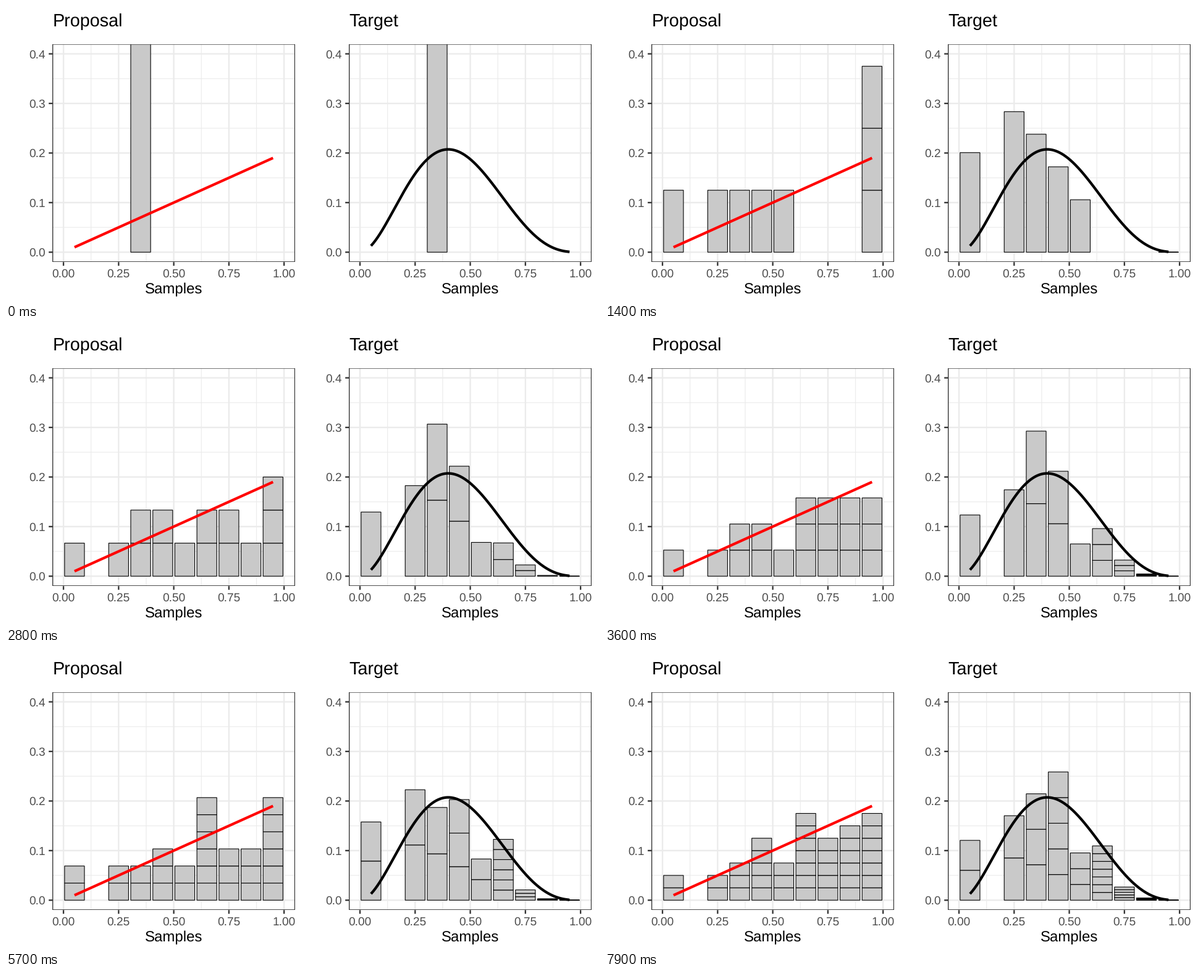
Recreate the animation shown at these times as a matplotlib script. Size 960 px wide and 480 px high, loop 8000 ms.

```python
import numpy as np
import matplotlib.pyplot as plt
from matplotlib.animation import FuncAnimation
from matplotlib.collections import PolyCollection
from matplotlib.patches import Rectangle

W, H, DPI = 960, 480, 100
PX = 72 / DPI                        # points per pixel
LEFT, RIGHT, TOP, BOTTOM = 75.2, 468, 61.5, 415.3
THICK = 2.33
STEP_MS = 200

# bin of every draw, in order (bin k covers (k-1)/10 to k/10)
DRAWS = [4, 1, 10, 10, 5, 3, 6, 10, 7, 8,
         4, 9, 7, 8, 5, 9, 7, 9, 8, 7,
         6, 10, 1, 10, 5, 7, 10, 3, 7, 10,
         9, 4, 5, 6, 7, 9, 8, 5, 9, 8]

plt.rcParams["font.family"] = "Liberation Sans"
plt.rcParams["text.hinting"] = "none"

fig = plt.figure(figsize=(W / DPI, H / DPI), dpi=DPI, facecolor="white")
page = fig.add_axes([0, 0, 1, 1])
page.set_xlim(0, W)
page.set_ylim(H, 0)
page.axis("off")


def label(x, y, text, size, color="black", ha="center"):
    page.text(x, y, text, fontsize=size * PX, color=color, ha=ha, va="baseline")


def tick(xs, ys):
    page.plot(xs, ys, color="#333333", lw=THICK * PX,
              solid_capstyle="butt", snap=False)


def to_x(v):
    return LEFT + (v + 0.05) / 1.1 * (RIGHT - LEFT)


def to_y(v):
    return BOTTOM - (v + 0.02) / 0.44 * (BOTTOM - TOP)


def make_panel(dx, title, curve, color):
    """Draw one framed plot and return its collection of bars."""
    ax = fig.add_axes([(LEFT + dx) / W, 1 - BOTTOM / H,
                       (RIGHT - LEFT) / W, (BOTTOM - TOP) / H])
    ax.set_xlim(-0.05, 1.05)
    ax.set_ylim(-0.02, 0.42)
    ax.axis("off")

    grid = dict(color="#EBEBEB", zorder=0, snap=False)
    for i in range(4):
        ax.axvline(0.125 + i / 4, lw=THICK / 2 * PX, **grid)
        ax.axhline(0.05 + i / 10, lw=THICK / 2 * PX, **grid)
    for i in range(5):
        ax.axvline(i / 4, lw=THICK * PX, **grid)
        ax.axhline(i / 10, lw=THICK * PX, **grid)

        x, y = to_x(i / 4) + dx, to_y(i / 10)
        tick([x, x], [BOTTOM, BOTTOM + 6])
        tick([LEFT + dx - 6, LEFT + dx], [y, y])
        label(x, 440, f"{i / 4:.2f}", 19.2, "#4D4D4D")
        label(LEFT + dx - 11, y + 6.9, f"{i / 10:.1f}", 19.2, "#4D4D4D", "right")

    bars = PolyCollection([], facecolors="#C9C9C9", edgecolors="black",
                          linewidths=1.1 * PX, zorder=2, snap=False,
                          joinstyle="miter")
    ax.add_collection(bars, autolim=False)

    xs = np.linspace(0.05, 0.95, 181)
    ax.plot(xs, curve(xs), color=color, lw=4.27 * PX, zorder=3,
            solid_capstyle="butt")
    ax.add_patch(Rectangle((0, 0), 1, 1, transform=ax.transAxes, fill=False,
                           ec="#333333", lw=THICK * PX, zorder=4, snap=False))

    label(LEFT + dx, 33, title, 28.8, ha="left")
    label((LEFT + RIGHT) / 2 + dx, 466, "Samples", 24)
    return bars


def stack(bins, weight):
    """Boxes of normalised weight, piled up bin by bin."""
    total = sum(weight(b / 10) for b in bins)
    tops = [0.0] * 11
    boxes = []
    for b in bins:
        lo = tops[b]
        hi = tops[b] = lo + weight(b / 10) / total
        x0, x1 = b / 10 - 0.095, b / 10 - 0.005
        boxes.append([(x0, lo), (x1, lo), (x1, hi), (x0, hi)])
    return boxes


proposal = make_panel(0, "Proposal", lambda x: 0.2 * x, "#FF0000")
target = make_panel(480, "Target", lambda x: 6 * x**2 * (1 - x)**3, "black")


def update(i):
    bins = DRAWS[:i + 1]
    proposal.set_verts(stack(bins, lambda x: 1))
    target.set_verts(stack(bins, lambda x: x * (1 - x)**3))
    return proposal, target


anim = FuncAnimation(fig, update, frames=len(DRAWS), interval=STEP_MS,
                     init_func=lambda: update(0), repeat=True, repeat_delay=0)
plt.show()
```
